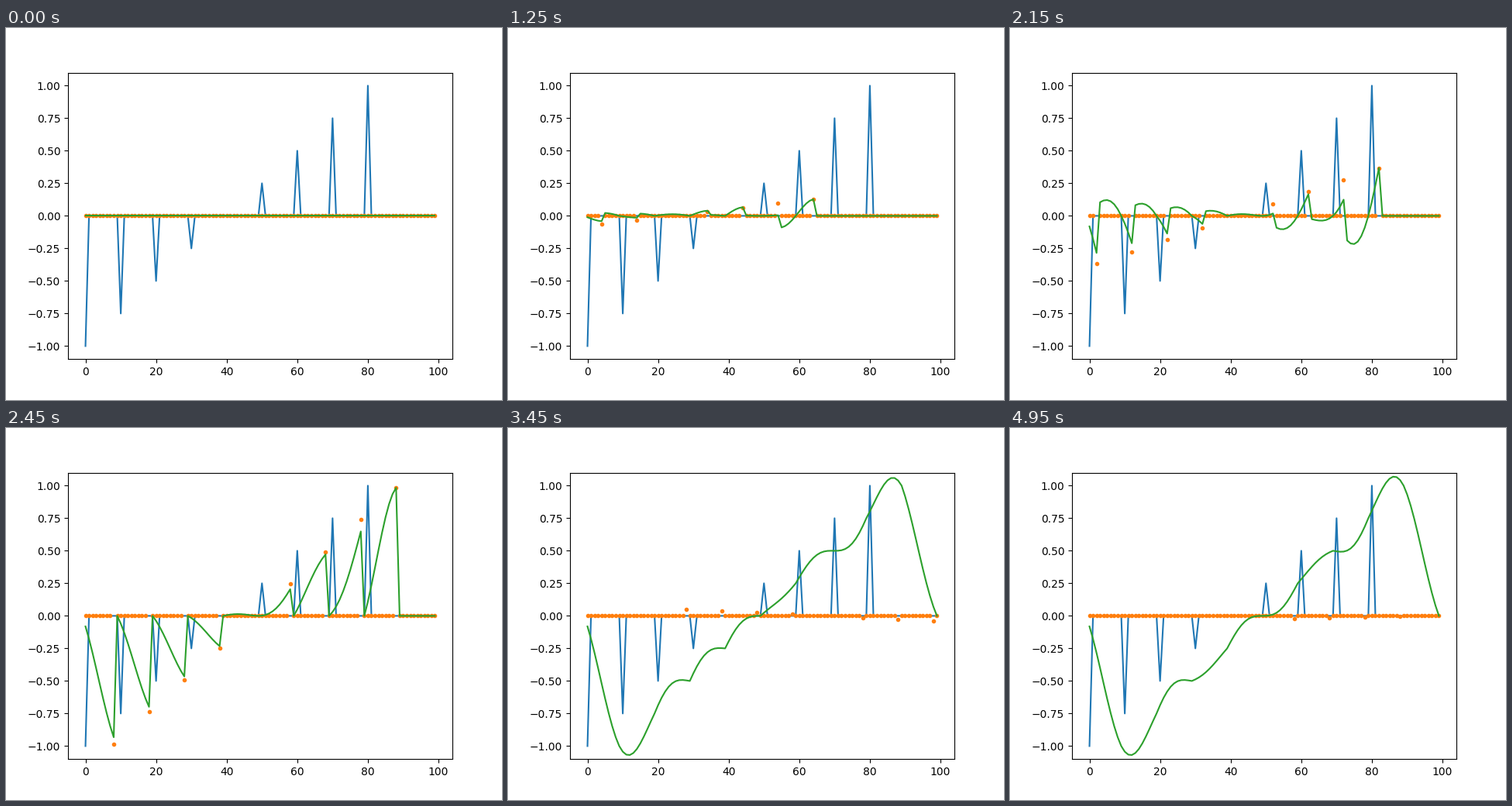
Write a matplotlib script that moves like this. It is 640 by 480 pixels and loops after 5 s.

```python
import numpy as np
import matplotlib.pyplot as plt
from matplotlib.animation import FuncAnimation

COUNT = 100   # samples, taps and frames
STEP = 10     # spacing of the input pulses
LEAD = 41     # the pulses enter this many samples early

n = np.arange(COUNT)
pulses = np.zeros(COUNT)
pulses[0:81:STEP] = np.linspace(-1, 1, 9)
kernel = np.sinc((n - COUNT / 2) / STEP)


def shifted(signal, by):
    """Move a signal right by some samples, filling with zeros."""
    src = n - by
    inside = (src >= 0) & (src < COUNT)
    return np.where(inside, signal[src % COUNT], 0.0)


# One row per frame: the shifted input scaled by one tap, and the running sum.
terms = np.array([kernel[i] * shifted(pulses, i - LEAD) for i in n])
sums = np.cumsum(terms, axis=0)

fig, ax = plt.subplots(figsize=(6.4, 4.8), dpi=100)
ax.plot(n, pulses)
dots, = ax.plot(n, terms[0], ".")
curve, = ax.plot(n, sums[0])
ax.set_xlim(-4.95, 103.95)
ax.set_ylim(-1.1, 1.1)


def update(i):
    dots.set_ydata(terms[i])
    curve.set_ydata(sums[i])
    return dots, curve


anim = FuncAnimation(fig, update, frames=COUNT, interval=50, repeat=True)
plt.show()
```
